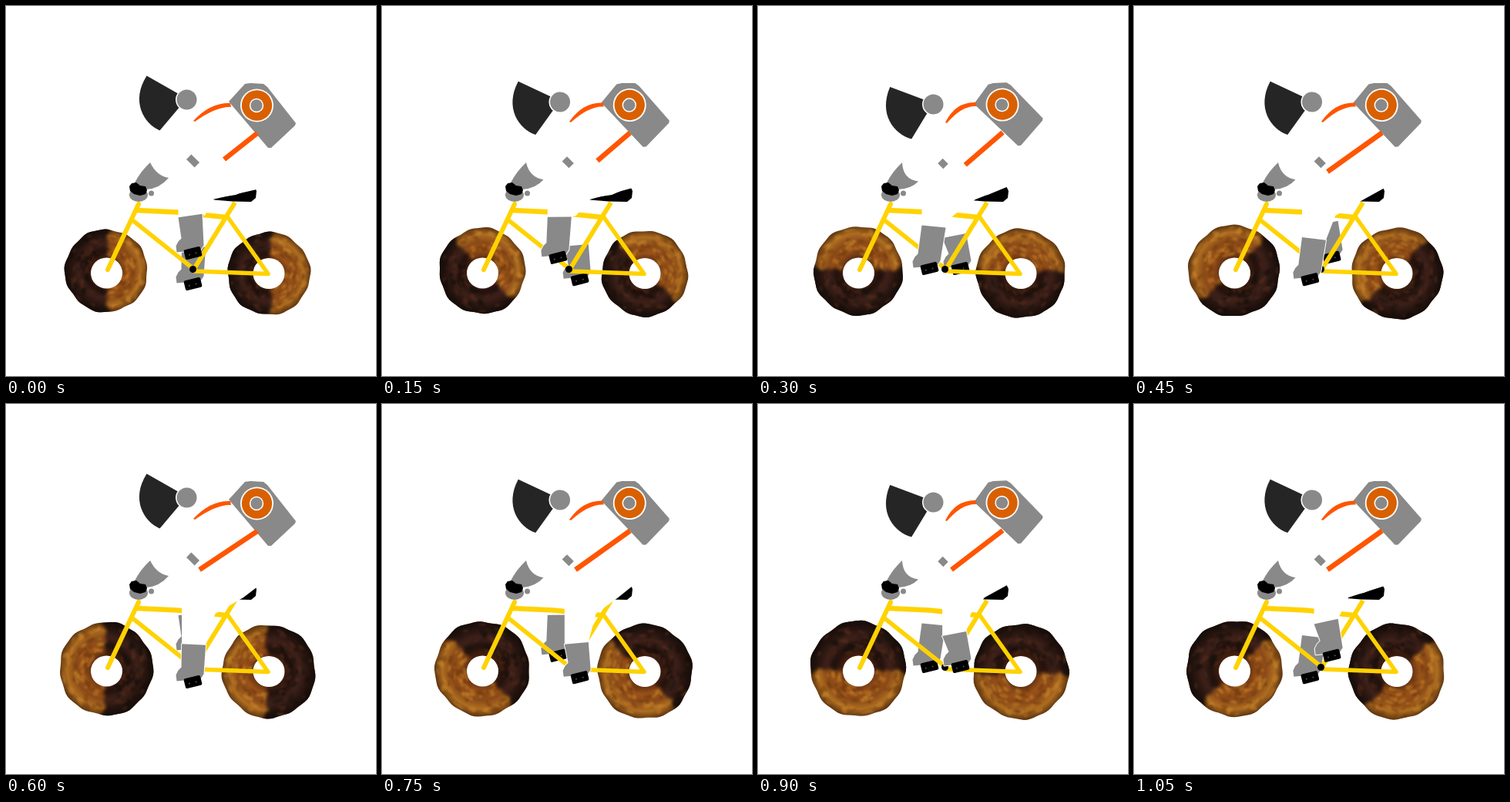
Animation, 480 px wide and 480 px high, one loop 1200 ms. Source, as an HTML page with a canvas:

```html
<!DOCTYPE html>
<html lang="en">
<head>
<meta charset="utf-8">
<title>Doughnut bicycle</title>
<style>
html, body { margin: 0; width: 100%; height: 100%; overflow: hidden; background: #fff; }
canvas { display: block; width: 100vmin; height: 100vmin; }
</style>
</head>
<body>
<canvas width="480" height="480"></canvas>
<script>
const ctx = document.querySelector('canvas').getContext('2d');
const STEPS = 8, STEP_MS = 150, TAU = Math.PI * 2;
const GREY = '#898989', YELLOW = '#ffd200', ORANGE = '#ff5500';
const { sin, cos, floor, min } = Math;

function polygon(points, fill, outline) {
  ctx.beginPath();
  points.forEach(p => ctx.lineTo(...p));
  ctx.closePath();
  if (outline) { ctx.strokeStyle = '#fff'; ctx.lineWidth = outline; ctx.stroke(); }
  ctx.fillStyle = fill;
  ctx.fill();
}

function oval(x, y, rx, fill, ry = rx, turn = 0) {
  ctx.beginPath();
  ctx.ellipse(x, y, rx, ry, turn, 0, TAU);
  ctx.fillStyle = fill;
  ctx.fill();
}

function line(points, color, width) {
  ctx.beginPath();
  points.forEach(p => ctx.lineTo(...p));
  ctx.strokeStyle = color;
  ctx.lineWidth = width;
  ctx.stroke();
}

function placed(x, y, degrees, draw) {
  ctx.save();
  ctx.translate(x, y);
  ctx.rotate(degrees * TAU / 360);
  draw();
  ctx.restore();
}

// Radial gradient over the ring between hole and rim
function ringGradient(...colors) {
  const gradient = ctx.createRadialGradient(0, 0, 18, 0, 0, 61);
  colors.forEach((color, i) => gradient.addColorStop(i / (colors.length - 1), color));
  return gradient;
}

function random(seed) {
  return () => (seed = (seed * 16807) % 2147483647) / 2147483647;
}

function specks(rnd, count, from, span, colors) {
  for (let i = 0; i < count; i++) {
    const a = from + rnd() * span, d = 22 + rnd() * 36;
    oval(d * cos(a), d * sin(a), 2 + rnd() * 4, colors[i % colors.length], 1 + rnd() * 2, a + 1.2 + rnd());
  }
}

function doughnut(x, y, radius, turn, seed) {
  const rnd = random(seed);
  placed(x, y, turn, () => {
    ctx.scale(radius / 60, radius / 60);
    ctx.beginPath();
    for (let a = 0; a < TAU; a += 0.07) {
      const r = 59.5 + sin(a * 5 + seed) * 0.8 + sin(a * 13) * 0.6;
      ctx.lineTo(r * cos(a), r * sin(a));
    }
    ctx.clip();
    oval(0, 0, 64, ringGradient('#5f2f12', '#9a5218', '#8a4a18', '#ae6d20', '#56300f'));
    ctx.filter = 'blur(1px)';
    specks(rnd, 90, 1.5, 3.3, ['#c9872d88', '#6c361077', '#b9752699', '#70390f77']);

    // Chocolate half with a ragged edge
    const glaze = [];
    for (let r = 12; r <= 66; r += 6) glaze.push([r * cos(1.55 + rnd() * 0.2), r]);
    for (let a = 1.5; a > -1.5; a -= 0.2) glaze.push([72 * cos(a), 72 * sin(a)]);
    for (let r = 66; r >= 12; r -= 6) glaze.push([r * cos(1.55 + rnd() * 0.2), -r]);
    ctx.filter = 'blur(2px)';
    polygon(glaze, ringGradient('#45210f', '#20100c', '#40221a', '#26140f', '#130c09'));
    ctx.filter = 'blur(1px)';
    specks(rnd, 60, -1.4, 2.8, ['#56301f77', '#140d0a88', '#4a281b88', '#10140f77']);
  });
}

function kneeAt(a) {
  return {
    x: 241.3 - 13.5 * sin(a + 0.17),
    y: 292 - 20 * cos(a) - 6 * sin(a),
    slope: -1.5 + 4.5 * sin(a) - 3 * cos(a)
  };
}

function leg(a) {
  const knee = kneeAt(a), x = 242.5 - 20 * sin(a), y = 340.5 - 20 * cos(a);
  const boot = [[14, -10], [10, -4], [-11, -2], [-21, -1], [-22, -9], [-19, -15], [-15, -19]];
  polygon([
    [knee.x - 15.5, knee.y - knee.slope / 2],
    [knee.x + 15.5, knee.y + knee.slope / 2],
    ...boot.map(([dx, dy]) => [x + dx, y + dy])
  ], GREY, 2);
  placed(x, y, -14, () => {
    ctx.beginPath();
    ctx.roundRect(-11, -6.5, 22, 13, 2);
    ctx.fillStyle = '#000';
    ctx.fill();
    oval(-5, 1, 1, '#555');
    oval(4, 1, 1, '#555');
  });
}

// White leg that hides part of the frame and, as it straightens, more of the saddle
function thigh(a) {
  const { x, y, slope } = kneeAt(a), front = x - 15.5, back = x + 15.5, saddle = y - 4;
  polygon([
    [front, 225], [324, 225], [325, 236 + 2 * cos(2 * a)], [saddle, 251],
    [back + (saddle - back) * 0.25, 272], [back, y + slope / 2], [front, y - slope / 2]
  ], '#fff');
}

function bicycle() {
  ctx.lineCap = ctx.lineJoin = 'round';
  line([[172, 257], [132, 342]], YELLOW, 6);
  line([[169, 265], [222, 267.5], [285, 274]], YELLOW, 6.5);
  line([[163, 277], [242, 340]], YELLOW, 5.5);
  line([[245, 344], [340, 347.5], [287, 273]], YELLOW, 5.5);
  ctx.lineCap = 'butt';
  line([[297, 255], [244, 341]], YELLOW, 6);
  polygon([[268, 249.5], [298, 245], [312, 239], [322, 233.5], [325, 240], [324, 249], [318, 254], [294, 253.5], [270, 251.5]], '#000');
  oval(242.5, 341.5, 4.5, '#000');
}

function backpack(x, y, tilt) {
  placed(x, y, tilt, () => {
    polygon([[-37, -5], [-16, -28], [-9, -29], [8, -28], [13, -24], [50, 23], [49, 26], [18, 55], [14, 55]], GREY);
    oval(-0.5, 0, 21.5, '#fff');
    oval(-0.5, 0, 19.7, '#d96000');
    oval(-1, 0, 9.2, '#fff');
    oval(-1, 0, 7.7, GREY);
  });
}

function straps(x, y, nod, reach) {
  ctx.beginPath();
  ctx.moveTo(243, 149 + 2 * nod);
  ctx.quadraticCurveTo(x - 61, y - 4, x - 35, y - 3);
  ctx.lineTo(x - 34, y + 2);
  ctx.quadraticCurveTo(x - 53, y + 1, 245, 150 + 2 * nod);
  ctx.fillStyle = ORANGE;
  ctx.fill();
  line([[251 + 32 * reach, 215 - 16 * reach], [x, y + 36]], ORANGE, 6.5);
}

function head(x, y, tilt) {
  placed(x, y, tilt, () => {
    ctx.beginPath();
    ctx.moveTo(-52, -31);
    ctx.lineTo(-8, -6);
    ctx.lineTo(-8, 8);
    ctx.lineTo(-35, 40);
    ctx.bezierCurveTo(-56, 31, -73, 2, -52, -31);
    ctx.fillStyle = '#252525';
    ctx.fill();
    oval(0, 0, 14.5, '#fff');
    oval(0, 0, 13, GREY);
  });
}

function arm(nod) {
  ctx.beginPath();
  ctx.moveTo(187, 203);
  ctx.quadraticCurveTo(195 - 7 * nod, 220 + 5 * nod, 211 - 3 * nod, 223 + 4.5 * nod);
  ctx.quadraticCurveTo(199, 237, 182, 238);
  ctx.lineTo(166, 231);
  ctx.quadraticCurveTo(174, 215, 187, 203);
  ctx.fillStyle = GREY;
  ctx.fill();
  oval(172, 245, 12, GREY, 9);
  oval(188.5, 243, 3.5, GREY);
  polygon([[160, 234], [163, 230], [169, 229], [174, 233], [181, 234], [183, 239], [181, 244], [174, 246], [166, 244], [161, 240]], '#000');
}

function render(step) {
  const a = step * TAU / STEPS;
  const nod = (1 - cos(2 * a)) / 2;                       // the rider nods twice per turn
  const reach = 1 - min(1, step / 3) ** 2;                // how far the elbow hides the strap
  const radius = 54 + 8.5 * (1 - (1 - step / 7) ** 2);    // the wheels swell

  ctx.fillStyle = '#fff';
  ctx.fillRect(0, 0, 480, 480);
  doughnut(130, 343.5, radius, 180 - step * 45, 71);
  doughnut(341, 347, radius, 180 - step * 45, 929);
  oval(130.5, 346.5, 20.5, '#fff', 20);
  oval(341, 347, 20.5, '#fff', 20);

  leg(a + Math.PI);
  bicycle();
  thigh(a);
  leg(a);

  const packX = 326 - 8.5 * nod, packY = 129 - nod;
  backpack(packX, packY, -6 * nod);
  straps(packX, packY, nod, reach);
  head(234.5 - 7 * nod, 121.5 + 6 * nod, -9 * nod);
  placed(242.5 - 2.5 * nod, 201 + 3.5 * nod, 45, () => {
    const width = 15 - 5 * nod;
    ctx.fillStyle = GREY;
    ctx.fillRect(-width / 2, -4.5, width, 9);
  });
  arm(nod);
}

const start = performance.now();
let shown = -1;
function tick() {
  const step = floor((performance.now() - start) / STEP_MS) % STEPS;
  if (step !== shown) render(shown = step);
  requestAnimationFrame(tick);
}
tick();
</script>
</body>
</html>
```
